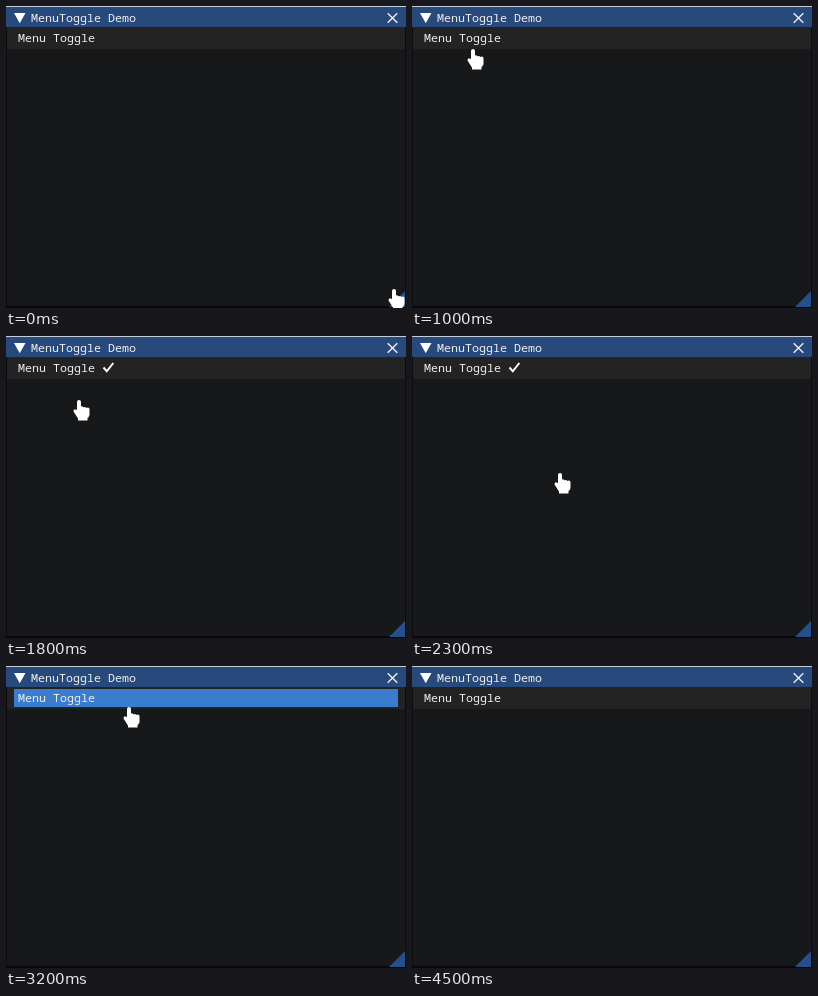
These frames come from a looping animation (400 by 302 pixels, 4.7 s). An HTML page with a canvas:

```html
<!DOCTYPE html>
<html lang="en">
<head>
<meta charset="utf-8">
<title>MenuToggle Demo</title>
<style>
  html, body { margin: 0; width: 100%; height: 100%; overflow: hidden; background: #17181a; }
  canvas { display: block; width: 400px; height: 302px; }
</style>
</head>
<body>
<canvas id="stage" width="400" height="302"></canvas>
<script>
const ctx = document.getElementById('stage').getContext('2d');
const W = 400, H = 302;
const LOOP = 4700, TICK = 100;
const CHECK_ON = 1500, CHECK_OFF = 2900, EXIT = 4000;

// Where the fingertip rests or turns; it eases between these
const stops = [
  { t: 0, x: 388, y: 283 },
  { t: 700, x: 66, y: 47 },
  { t: 1000, x: 61, y: 43 },
  { t: 1300, x: 57, y: 41 },
  { t: 1700, x: 57, y: 41 },
  { t: 2100, x: 160, y: 190 },
  { t: 2600, x: 126, y: 40 },
  { t: 3500, x: 122, y: 41 },
  { t: 3600, x: 122, y: 43 },
  { t: EXIT, x: 404, y: 258 }
];

const ease = k => k * k * (3 - 2 * k);
const mix = (a, b, k) => Math.round(a + (b - a) * k);

function pointerAt(t) {
  const i = stops.findIndex(s => s.t > t);
  const a = stops[i - 1], b = stops[i];
  const k = ease((t - a.t) / (b.t - a.t));
  return [mix(a.x, b.x, k), mix(a.y, b.y, k)];
}

function rect(x, y, w, h, color) {
  ctx.fillStyle = color;
  ctx.fillRect(x, y, w, h);
}

function poly(points, color) {
  ctx.beginPath();
  points.forEach(([x, y]) => ctx.lineTo(x, y));
  ctx.closePath();
  ctx.fillStyle = color;
  ctx.fill();
}

function line(points, width, color) {
  ctx.beginPath();
  points.forEach(([x, y]) => ctx.lineTo(x, y));
  ctx.lineWidth = width;
  ctx.strokeStyle = color;
  ctx.stroke();
}

function label(text, x, y) {
  ctx.font = '11.667px "Noto Sans Mono", "DejaVu Sans Mono", monospace';
  ctx.fillStyle = '#f0f0f0';
  ctx.fillText(text, x, y);
}

function cross(x, y, r) {
  for (const s of [-1, 1]) line([[x - r, y - r * s], [x + r, y + r * s]], 1.4, '#eee');
}

function drawHand(x, y) {
  ctx.save();
  ctx.translate(x, y);
  ctx.beginPath();
  ctx.roundRect(-2, 0, 4, 14, 2);
  for (let i = 0; i < 3; i++) ctx.roundRect(1 + i * 3, 6.2 + i * 0.7, 3.5, 9, 1.6);
  ctx.roundRect(-2, 10, 12, 8, 2);
  ctx.rect(-1, 16, 9.5, 4.5);
  ctx.fillStyle = '#fff';
  ctx.fill();
  poly([[-5, 9.5], [-3, 9.5], [0, 12], [0, 19], [-1, 18.5], [-5.5, 11.5]], '#fff');
  ctx.restore();
}

function drawWindow(hovered, checked) {
  rect(0, 0, W, H, '#17181a');
  rect(0, 0, W, 1, '#c4ccd6');
  rect(0, 1, W, 20, '#27497c');
  poly([[8, 7], [19.5, 7], [13.75, 17.3]], '#fff');
  label('MenuToggle Demo', 25, 16);
  cross(386.5, 12, 4.8);

  rect(0, 21, W, 22, '#232323');
  if (hovered) rect(8, 23, 384, 18, '#3a7dce');
  label('Menu Toggle', 12, 36);
  if (checked) line([[97.5, 31.5], [100.8, 35.3], [107.3, 27]], 2, '#fff');

  for (const x of [0, W - 1]) rect(x, 21, 1, H - 21, '#0a0b0d');
  rect(0, H - 2, W, 2, '#08080a');
  poly([[W - 1, 285], [W - 1, H - 1], [383, H - 1]], '#25508c');
}

function frame(now) {
  const t = Math.floor((now % LOOP) / TICK) * TICK;
  const checked = t >= CHECK_ON && t < CHECK_OFF;
  if (t >= EXIT) return drawWindow(false, checked);
  const [x, y] = pointerAt(t);
  drawWindow(y >= 23 && y < 42, checked);
  drawHand(x, y);
}

let start = null;
function loop(now) {
  if (start === null) start = now;
  frame(now - start);
  requestAnimationFrame(loop);
}
frame(0);
requestAnimationFrame(loop);
</script>
</body>
</html>
```
